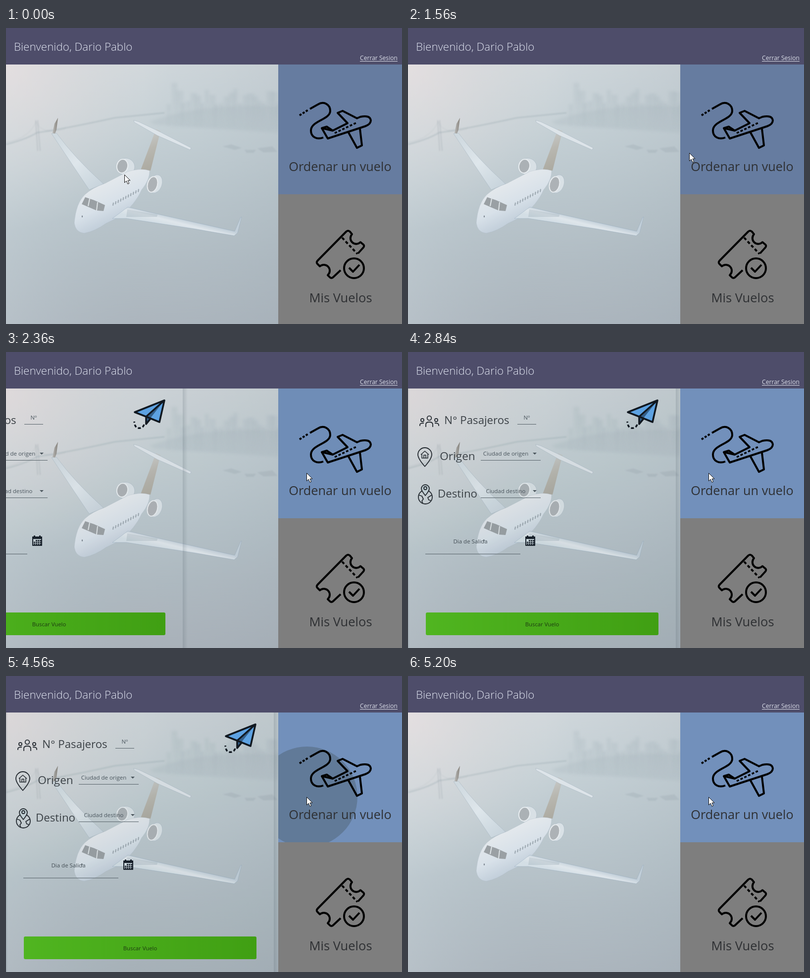
These frames come from a looping animation (800x600 px, 5.24 s). An HTML page with a canvas:

```html
<!DOCTYPE html>
<html lang="es">
<head>
<meta charset="utf-8">
<title>Vuelos</title>
<style>
html, body { margin: 0; width: 100%; height: 100%; overflow: hidden; }
canvas { display: block; }
</style>
</head>
<body>
<canvas id="stage" width="800" height="600"></canvas>
<script>
let ctx = document.getElementById('stage').getContext('2d');
const LOOP = 5240, STEP = 40, PANEL_W = 541, MAIN_W = 550, TOP = 74;
const FONT = '"Open Sans", "Noto Sans", sans-serif';
const PRESSES = [1920, 4480];
const IDLE = [102, 124, 160], FOCUSED = [114, 144, 187];
const CURSOR = [[980, 239, 297], [1080, 236, 306], [1180, 280, 311], [1300, 400, 295],
  [1420, 520, 266], [1500, 577, 256], [1560, 568, 253], [1620, 562, 266],
  [1700, 590, 255], [1760, 607, 245]];

const clamp = v => Math.max(0, Math.min(1, v));
const mix = (a, b, k) => a + (b - a) * k;

// Short acceleration and braking around a constant speed
function easeBoth(t) {
  t = clamp(t);
  if (t < 0.2) return 3.125 * t * t;
  if (t > 0.8) return 1 - 3.125 * (1 - t) ** 2;
  return 1.25 * t - 0.125;
}

function draw(d, { fill, stroke, width = 1, dash = [] }) {
  const path = new Path2D(d);
  if (fill) { ctx.fillStyle = fill; ctx.fill(path); }
  if (stroke) {
    ctx.strokeStyle = stroke;
    ctx.lineWidth = width;
    ctx.setLineDash(dash);
    ctx.stroke(path);
    ctx.setLineDash([]);
  }
}

function rect(x, y, w, h, fill) {
  ctx.fillStyle = fill;
  ctx.fillRect(x, y, w, h);
}

function oval(x, y, rx, ry, turn, style) {
  ctx.beginPath();
  ctx.ellipse(x, y, rx, ry, turn, 0, 7);
  if (style.fill) { ctx.fillStyle = style.fill; ctx.fill(); }
  if (style.stroke) {
    ctx.strokeStyle = style.stroke;
    ctx.lineWidth = style.width || 1;
    ctx.stroke();
  }
}

function text(str, x, y, size, color, align = 'left', weight = 400) {
  ctx.font = `${weight} ${size}px ${FONT}`;
  ctx.fillStyle = color;
  ctx.textAlign = align;
  ctx.fillText(str, x, y);
}

function linear(x0, y0, x1, y1, ...colors) {
  const g = ctx.createLinearGradient(x0, y0, x1, y1);
  colors.forEach((c, i) => g.addColorStop(i / (colors.length - 1), c));
  return g;
}

function sky() {
  rect(0, TOP, MAIN_W, 526, linear(0, TOP, 0, 600, '#d1d8dc', '#c6d1d6', '#bbc7cd', '#b2bdc4', '#acb5bd'));
  const glow = ctx.createRadialGradient(0, 80, 0, 0, 80, 330);
  glow.addColorStop(0, 'rgba(240,225,224,.85)');
  glow.addColorStop(1, 'rgba(226,226,226,0)');
  rect(0, TOP, MAIN_W, 340, glow);
  rect(0, TOP, MAIN_W, 526, linear(0, 0, MAIN_W, 0, 'rgba(208,219,224,.3)', 'rgba(175,190,198,.05)', 'rgba(150,164,174,.2)'));

  // Hazy skyline
  ctx.save();
  ctx.filter = 'blur(2.5px)';
  for (let i = 0; i < 24; i++) {
    const x = 325 + i * 9.6, n = Math.abs(Math.sin(i * 12.9) * 43758) % 1;
    const top = 155 - n * 28 - (i === 1 || i === 8 || i === 14 ? 26 : 0);
    rect(x, top, 7 + n * 7, 205 - top, linear(0, top, 0, 205, 'rgba(135,155,164,.13)', 'rgba(135,155,164,0)'));
  }
  draw('M290 190Q400 150 550 160V212Q430 205 300 195Z', { fill: 'rgba(140,158,166,.12)' });
  ctx.filter = 'blur(1px)';

  // Bridge and shore
  draw('M0 236Q40 226 63 212Q110 206 220 182L320 172', { stroke: 'rgba(145,160,168,.28)', width: 3 });
  draw('M0 232Q45 225 61 190Q72 218 120 204', { stroke: 'rgba(150,162,168,.2)' });
  draw('M60 187L64 249M64 187L69 249', { stroke: 'rgba(150,160,168,.3)', width: 2 });
  draw('M438 240L455 236L476 243L462 247ZM482 247L505 247L500 253L486 253ZM508 244L538 240L548 251L520 252Z', { fill: 'rgba(140,156,165,.22)' });
  ctx.restore();
}

function jet() {
  const edge = 'rgba(150,168,182,.4)';
  draw('M92 214L102 213Q139 264 197 316L168 328Z', { fill: linear(100, 220, 185, 325, '#cfd9df', '#dee6eb', '#c8d4dc'), stroke: edge });
  draw('M94 213L98 194L105 182L102 206L99 214Z', { fill: linear(94, 0, 105, 0, '#b9b9b7', '#87837d') });

  // Tail and engines
  oval(242, 281, 18, 17, 0.2, { fill: '#d8e0e5', stroke: edge });
  oval(235, 280, 11, 14, 0.2, { fill: '#abb1b5', stroke: '#e8edf0', width: 2 });
  draw('M272 288L303 205L312 209L292 289Z', { fill: linear(278, 210, 303, 280, '#c8cbcb', '#b8b7b0', '#adaba2') });
  draw('M258 187L268 190L310 210L374 243L372 247L306 218L259 191Z', { fill: '#dde4e9', stroke: edge });

  draw('M138 395Q141 356 159 338Q174 324 200 315L246 291Q273 283 290 289Q291 307 274 328Q262 356 231 382L202 396Q180 412 158 416Q140 414 138 395Z',
    { fill: linear(190, 320, 225, 394, '#e3e8ec', '#d8e1e9', '#bfccd8'), stroke: 'rgba(165,180,192,.3)' });

  oval(302, 316, 13, 19, 0.35, { fill: '#d9e1e6', stroke: edge });
  oval(296, 317, 10, 16, 0.25, { fill: '#adb2b6', stroke: '#e7ebee', width: 2 });

  draw('M215 386L246 363Q260 366 288 373L462 412L474 384L476 383L468 415L461 421L380 407L243 386Z',
    { fill: linear(330, 380, 325, 400, '#c2cfd9', '#dfe6eb', '#d3dee5'), stroke: 'rgba(135,158,178,.38)' });
  draw('M245 368L306 378L305 383L243 383Z', { fill: 'rgba(145,160,172,.28)' });

  draw('M153 357L160 343L178 349L200 359L197 371L183 370Z', { fill: '#9aa0a4' });
  draw('M169 346L166 361M185 353L183 370', { stroke: '#dfe5e8', width: 2 });
  for (let i = 0; i < 11; i++) {
    const x = 217 + i * 5.1, y = 354 - i * 2.75;
    draw(`M${x} ${y}l-1 6`, { stroke: '#9ba6af', width: 2 });
  }
  oval(154, 382, 1.2, 2, 0, { fill: '#7d8790' });
}

function flightIcon() {
  const pen = { stroke: '#000', width: 4 };
  draw('M593 177L612 165', { ...pen, dash: [4.5, 3] });
  draw('M614 164L630 155C643 147 655 156 655 168C655 186 616 188 616 208C616 221 628 227 641 222', pen);
  draw('M650 224L638 203L648 200L660 208L690 193L670 172L680 168L709 183L716 180Q735 176 737 187Q737 195 726 199L650 224Z', pen);
  draw('M638 203L660 208', pen);
  draw('M692 212L709 243L719 238L715 204', pen);
  draw('M664 213L710 191', { stroke: '#000', width: 3.6, dash: [5, 3.5] });
}

function ticketIcon() {
  const pen = { stroke: '#000', width: 4 };
  draw('M676 491L661 505Q657 509 653 504L650 501A11 11 0 0 0 634 483L629 478Q626 475 630 471L687 413Q691 409 695 413L699 418A11 11 0 0 0 716 434L722 439Q725 442 721 446L711 457', pen);
  draw('M679 425L710 458', { ...pen, dash: [6, 4.5] });
  oval(703, 487, 20, 20, 0, pen);
  draw('M693 486L701 494L714 480', pen);
}

function sidebar(t) {
  const lit = clamp((t - PRESSES[0]) / 400);
  rect(MAIN_W, TOP, 250, 263, `rgb(${IDLE.map((v, i) => Math.round(mix(v, FOCUSED[i], lit)))})`);
  rect(MAIN_W, 337, 250, 263, '#7e7e7e');

  ctx.save();
  ctx.beginPath();
  ctx.rect(MAIN_W, TOP, 250, 263);
  ctx.clip();
  for (const start of PRESSES) {
    const age = t - start;
    if (age <= 0 || age > 480) continue;
    const radius = 500 * (1 - Math.exp(-0.00285 * age));
    const alpha = 0.4 * clamp((480 - age) / 320);
    oval(608, 245, radius, radius, 0, { fill: `rgba(72,88,100,${alpha})` });
  }
  ctx.restore();

  flightIcon();
  ticketIcon();
  text('Ordenar un vuelo', 675, 290, 25.3, '#2e3033', 'center');
  text('Mis Vuelos', 676, 556, 25.5, '#2e3033', 'center');
}

function header() {
  rect(0, 0, 800, TOP, '#4e4d6a');
  text('Bienvenido, Dario Pablo', 16, 46, 22.4, '#dfe3f0', 'left', 300);
  text('Cerrar Sesion', 753, 65, 12.1, '#dcdfea', 'center');
  rect(715, 67, 76, 1, '#dcdfea');
}

function formIcons() {
  const ink = '#252b31', pen = { stroke: ink, width: 1.8 };
  // Passengers
  for (const [x, y, s] of [[43, 134, 1.2], [29, 138, 0.85], [57, 138, 0.85]]) {
    oval(x, y, 3.6 * s, 3.6 * s, 0, pen);
  }
  draw('M36 152V147Q36 142 43 142Q50 142 50 147V152M24 150V147Q25 144 32 144M62 150V147Q61 144 54 144', pen);
  // Map pin with a house
  draw('M34 232Q20 216 20 208A14 14 0 0 1 48 208Q48 216 34 232Z', pen);
  draw('M26 208L34 201L42 208M28 207V215H40V207M32 215V209H36V215', { stroke: ink, width: 1.5 });
  // Globe with a pin
  oval(35, 294, 14, 14, 0, pen);
  draw('M35 291Q27 281 27 277A8 8 0 0 1 43 277Q43 281 35 291Z', { ...pen, fill: '#bfcdd2' });
  oval(35, 276, 3, 3, 0, pen);
  draw('M22 290L28 292L31 298L28 302L30 307M48 290L40 295L42 300L46 301', pen);
  // Calendar
  draw('M238 375H256V392H238Z', { stroke: '#17202a', width: 2 });
  rect(237, 374, 20, 5, '#17202a');
  rect(240, 372, 3, 3, '#17202a');
  rect(251, 372, 3, 3, '#17202a');
  for (let i = 1; i < 12; i++) rect(240 + i % 4 * 4, 381 + Math.floor(i / 4) * 3.6, 3, 2.5, '#17202a');
}

function paperPlane() {
  const dark = '#111820';
  draw('M504 98L444 122L467 131ZM504 98L475 134L494 142Z', { fill: '#5da2e2' });
  draw('M504 98L467 131V146L475 135Z', { fill: '#335f8a' });
  draw('M504 98L444 122L467 131L494 142ZM504 98L467 131V146L476 135', { stroke: dark, width: 3.6 });
  draw('M463 147Q460 156 449 154Q444 151 443 141', { stroke: dark, width: 3.5, dash: [6, 4] });
}

function field(x, y, w, label, size, arrowX) {
  text(label, arrowX ? x + w / 2 - 10 : x + w / 2, y - 10, size, '#4a555d', 'center');
  rect(x, y - 1, w, 1, '#58636a');
  if (arrowX) draw(`M${arrowX} ${y - 16}h8l-4 4Z`, { fill: '#4b565d' });
}

function drawer(open) {
  if (open <= 0) return;
  ctx.save();
  ctx.beginPath();
  ctx.rect(0, TOP, MAIN_W, 526);
  ctx.clip();
  rect(0, TOP, MAIN_W, 526, `rgba(60,75,85,${0.05 * open})`);
  ctx.translate(Math.round(PANEL_W * (open - 1)), 0);

  rect(PANEL_W, TOP, 10, 526, linear(PANEL_W, 0, PANEL_W + 10, 0, 'rgba(75,90,100,.2)', 'rgba(75,90,100,0)'));
  rect(0, TOP, 3, 526, linear(0, 0, 3, 0, 'rgba(65,80,90,.2)', 'rgba(65,80,90,0)'));

  formIcons();
  paperPlane();
  text('N° Pasajeros', 139, 146, 22.2, '#3b4146', 'center');
  text('Origen', 100, 219, 22.6, '#3b4146', 'center');
  text('Destino', 100, 295, 22.3, '#3b4146', 'center');
  field(221, 147, 38, 'N°', 11.2);
  field(147, 220, 121, 'Ciudad de origen', 11.5, 252);
  field(147, 296, 121, 'Ciudad destino', 11.4, 252);
  text('Dia de Salida', 126, 388, 11.5, '#454f56', 'center');
  rect(35, 409, 192, 1, '#58636a');

  ctx.beginPath();
  ctx.roundRect(36, 528, 470, 46, 3);
  ctx.fillStyle = linear(36, 0, 506, 0, '#50b520', '#409f13');
  ctx.fill();
  text('Buscar Vuelo', 271, 556, 11.3, '#1d3b12', 'center');
  ctx.restore();
}

function cursorAt(t) {
  const last = CURSOR.length - 1;
  if (t <= CURSOR[0][0]) return CURSOR[0].slice(1);
  if (t >= CURSOR[last][0]) return CURSOR[last].slice(1);
  const i = CURSOR.findIndex(p => p[0] > t) - 1;
  const [a, b, c, d] = [-1, 0, 1, 2].map(k => CURSOR[Math.max(0, Math.min(last, i + k))]);
  const u = (t - b[0]) / (c[0] - b[0]);
  return [1, 2].map(k => Math.round(b[k] + 0.5 * u * (c[k] - a[k] +
    u * (2 * a[k] - 5 * b[k] + 4 * c[k] - d[k] + u * (3 * (b[k] - c[k]) + d[k] - a[k])))));
}

function cursor(t) {
  ctx.save();
  ctx.translate(...cursorAt(t));
  draw('M.5 .5V16.5L4.2 13L7 19.2L9.7 18L7 12H12Z', { fill: '#fff', stroke: '#111', width: 1 });
  ctx.restore();
}

// The scene behind the drawer never changes, so it is painted once
function paintBackdrop() {
  const layer = document.createElement('canvas');
  layer.width = MAIN_W;
  layer.height = 600;
  const screen = ctx;
  ctx = layer.getContext('2d');
  ctx.lineJoin = 'round';
  sky();
  jet();
  ctx = screen;
  return layer;
}

const backdrop = paintBackdrop();

function frame(now) {
  const t = Math.floor(now % LOOP / STEP) * STEP;
  const open = easeBoth((t - 2046) / 500) - easeBoth((t - 4608) / 500);
  ctx.lineJoin = 'round';
  ctx.drawImage(backdrop, 0, 0);
  drawer(open);
  sidebar(t);
  header();
  cursor(t);
}

const begin = performance.now();
function tick() {
  frame(performance.now() - begin);
  requestAnimationFrame(tick);
}
tick();
</script>
</body>
</html>
```
